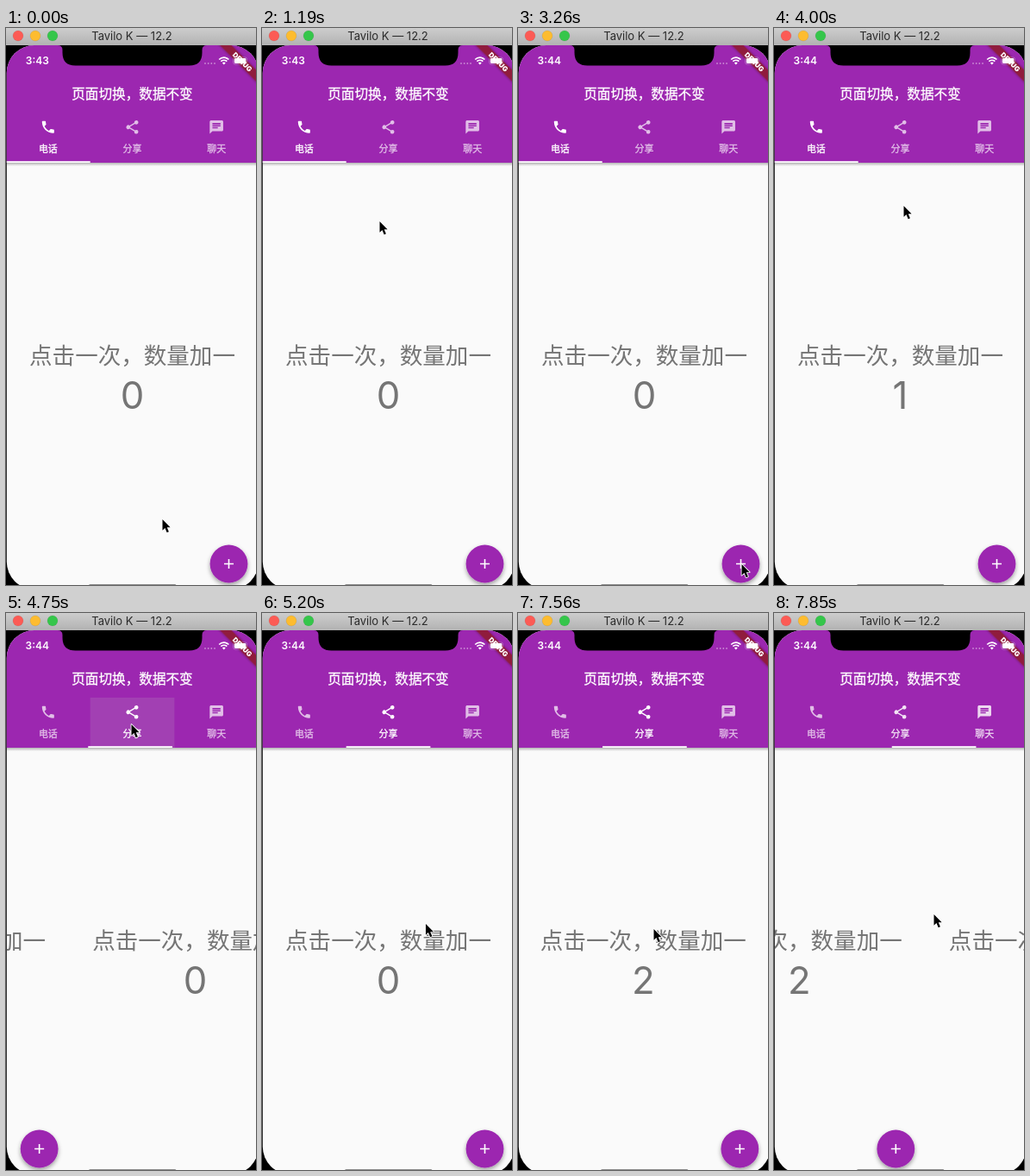
An HTML page that plays this animation: 290x645 px, repeating every 8000 ms.

```html
<!DOCTYPE html>
<html lang="zh">
<head>
<meta charset="utf-8">
<title>页面切换</title>
<style>
html, body { margin: 0; width: 100%; height: 100%; overflow: hidden; background: #000; }
svg { display: block; width: 290px; height: 645px; }
text { text-anchor: middle; font-family: "Noto Sans CJK SC", "Noto Sans CJK", sans-serif; }
.latin { font-family: Inter, Roboto, sans-serif; }
.bar { font-weight: 500; fill: #fff; stroke: #fff; stroke-width: .3; }
.grey { fill: #757575; }
.prompt { font-weight: 350; }
</style>
</head>
<body>
<svg viewBox="0 0 290 645">
  <defs>
    <linearGradient id="chrome" x2="0" y2="1">
      <stop stop-color="#cdcdcd"/><stop offset="1" stop-color="#b2b2b2"/>
    </linearGradient>
    <linearGradient id="shade" x2="0" y2="1">
      <stop stop-opacity=".32"/><stop offset="1" stop-opacity="0"/>
    </linearGradient>
    <clipPath id="screen"><rect x=".8" y="20" width="292.2" height="630" rx="32"/></clipPath>
    <filter id="lift" x="-40%" y="-40%" width="180%" height="190%">
      <feDropShadow dx="0" dy="2.6" stdDeviation="2.4" flood-opacity=".38"/>
    </filter>
    <filter id="glow" x="-20%" y="-80%" width="140%" height="260%">
      <feDropShadow dx="0" dy="0" stdDeviation="1.8" flood-opacity=".45"/>
    </filter>
    <g id="page">
      <text class="grey prompt" x="146.5" y="388.8" font-size="26.56">点击一次，数量加一</text>
      <circle cx="258.5" cy="620.5" r="21.9" fill="#9c27b0" filter="url(#lift)"/>
      <path d="M253 620.5h11M258.5 615v11" stroke="#fff" stroke-width="1.6"/>
    </g>
  </defs>

  <rect width="290" height="645"/>
  <g clip-path="url(#screen)">
    <rect y="20" width="293" height="630" fill="#fafafa"/>
    <g id="pages"></g>
    <rect y="155.5" width="293" height="4.5" fill="url(#shade)"/>
    <rect y="20" width="293" height="136" fill="#9c27b0"/>
    <rect id="ripple" x="97.7" y="98" width="97.7" height="58" fill="#c2c2c2"/>
    <text class="bar" x="146.5" y="81.8" font-size="15.62">页面切换，数据不变</text>
    <g id="tabs"></g>
    <rect id="line" y="154.2" width="97.7" height="1.8" fill="#fff"/>
    <g transform="translate(293 20.5) rotate(45)">
      <rect x="-40" y="21.9" width="80" height="9.4" fill="#901c3c" filter="url(#glow)"/>
      <text class="latin" y="29.5" font-size="8" font-weight="900" fill="#fff">DEBUG</text>
    </g>
    <g fill="#fff">
      <text class="latin" x="36.3" y="42.2" font-size="12" font-weight="600">3:4<tspan id="minute">3</tspan></text>
      <path d="M231 41h12" stroke="#fff" stroke-width="1.8" stroke-linecap="round" stroke-dasharray="0 3.67" opacity=".45"/>
      <path d="M252.8 42.4l-1.9-2a2.7 2.7 0 0 1 3.8 0z"/>
      <path d="M249.3 38.7a5 5 0 0 1 7 0M247.2 36.5a8 8 0 0 1 11.2 0" fill="none" stroke="#fff" stroke-width="1.7"/>
      <rect x="263.6" y="33.9" width="16" height="8.2" rx="2.4" fill="none" stroke="#fff" stroke-opacity=".4" stroke-width=".7"/>
      <rect x="264.8" y="35.1" width="13.6" height="5.8" rx="1.4"/>
    </g>
    <rect x="96" y="644" width="101.5" height="4" rx="1.8" fill="#8c8c8c"/>
  </g>
  <path d="M60 20q5.5 0 5.5 5.5v3q0 15 15 15h132q15 0 15-15v-3q0-5.5 5.5-5.5z"/>

  <rect width="290" height="20" fill="url(#chrome)"/>
  <g stroke-opacity=".12" stroke="#000" stroke-width=".6">
    <circle cx="14" cy="9" r="6" fill="#fc5b55"/>
    <circle cx="34" cy="9" r="6" fill="#fdbc2f"/>
    <circle cx="54" cy="9" r="6" fill="#35c64a"/>
  </g>
  <text class="latin" x="146" y="13.8" font-size="13" fill="#2b2b2b">Tavilo K — 12.2</text>

  <g id="cursor">
    <path transform="translate(.5 1) scale(.86)" d="M0 0V14.8L3.4 11.6L6 17.6L8.6 16.5L6.1 10.7H10.6Z"
      stroke="#fff" stroke-width="2" stroke-linejoin="round" paint-order="stroke"/>
  </g>
</svg>

<script>
const LOOP = 8000, FRAMES = 54, PAGE = 293, TAB = PAGE / 3;
const $ = id => document.getElementById(id);

const tabList = [
  ["电话", "M6.62 10.79c1.44 2.83 3.76 5.14 6.59 6.59l2.2-2.2c.27-.27.67-.36 1.02-.24 1.12.37 2.33.57 3.57.57.55 0 1 .45 1 1V20c0 .55-.45 1-1 1C10.61 21 3 13.39 3 4c0-.55.45-1 1-1h3.5c.55 0 1 .45 1 1 0 1.25.2 2.45.57 3.57.11.35.03.74-.25 1.02z"],
  ["分享", "M18 16.08c-.76 0-1.44.3-1.96.77L8.91 12.7c.05-.23.09-.46.09-.7s-.04-.47-.09-.7l7.05-4.11A3 3 0 1 0 15 5c0 .24.04.47.09.7L8.04 9.81a3 3 0 1 0 0 4.38l7.12 4.16a2.92 2.92 0 1 0 2.84-2.27z"],
  ["聊天", "M20 2H4c-1.1 0-2 .9-2 2v18l4-4h14c1.1 0 2-.9 2-2V4c0-1.1-.9-2-2-2zM6 9h12v2H6zM14 14H6v-2h8zM18 8H6V6h12z"]
];

$("tabs").innerHTML = tabList.map(([label, icon], i) => {
  const x = TAB * (i + .5);
  return `<g><path d="${icon}" fill="#fff" fill-rule="evenodd" transform="translate(${x - 9.4} 105.4) scale(.781)"/>
    <text class="bar" x="${x}" y="144" font-size="10.94">${label}</text></g>`;
}).join("");

$("pages").innerHTML = tabList.map((_, i) =>
  `<g transform="translate(${i * PAGE})"><use href="#page"/>
   <text class="latin grey count" x="146.5" y="440.5" font-size="43.7">0</text></g>`).join("");

const tabs = [...$("tabs").children];
const counts = document.querySelectorAll(".count");

// pointer moves: first step, last step, x, y
const home = [181, 568];
const moves = [
  [0, 2, 211, 606], [2, 5, 158, 341], [6, 8, 136, 223], [8, 10, 61, 135],
  [11, 16, 205, 432], [17, 22, 259, 620], [24, 27, 150, 205], [28, 29, 145, 128],
  [33, 36, 205, 440], [37, 41, 265, 619], [45, 51, 157, 365], [51, 53, 185, 348]
];

const ramp = (k, from, to) => Math.min(1, Math.max(0, (k - from) / (to - from)));
const easeOut = (p, power) => 1 - (1 - p) ** power;
const smooth = p => p * p * (3 - 2 * p);

function pointerAt(k) {
  return moves.reduce(([x, y], [from, to, toX, toY]) => {
    const p = smooth(ramp(k, from, to));
    return [x + (toX - x) * p, y + (toY - y) * p];
  }, home);
}

function draw(now) {
  // the screen is refreshed in even steps
  const k = Math.floor((now % LOOP + 5) * FRAMES / LOOP) % FRAMES;
  const tap = ramp(k, 31, 33.7);
  const drag = .4 * easeOut(ramp(k, 50.99, 53), 2);
  const page = easeOut(tap, 3) + drag;
  const tab = easeOut(tap, 8) + drag;

  $("cursor").setAttribute("transform", `translate(${pointerAt(k)})`);
  $("pages").setAttribute("transform", `translate(${-page * PAGE})`);
  $("line").setAttribute("x", tab * TAB);
  $("ripple").setAttribute("opacity", k < 32 ? 0 : .16 * (1 - ramp(k, 32, 35)));
  $("minute").textContent = k < 9 ? 3 : 4;
  counts[0].textContent = +(k >= 24);
  counts[1].textContent = (k >= 40) + (k >= 45);
  tabs.forEach((el, i) =>
    el.setAttribute("opacity", .7 + .3 * Math.max(0, 1 - Math.abs(tab - i))));
}

function tick() {
  draw(performance.now());
  requestAnimationFrame(tick);
}
tick();
</script>
</body>
</html>
```
